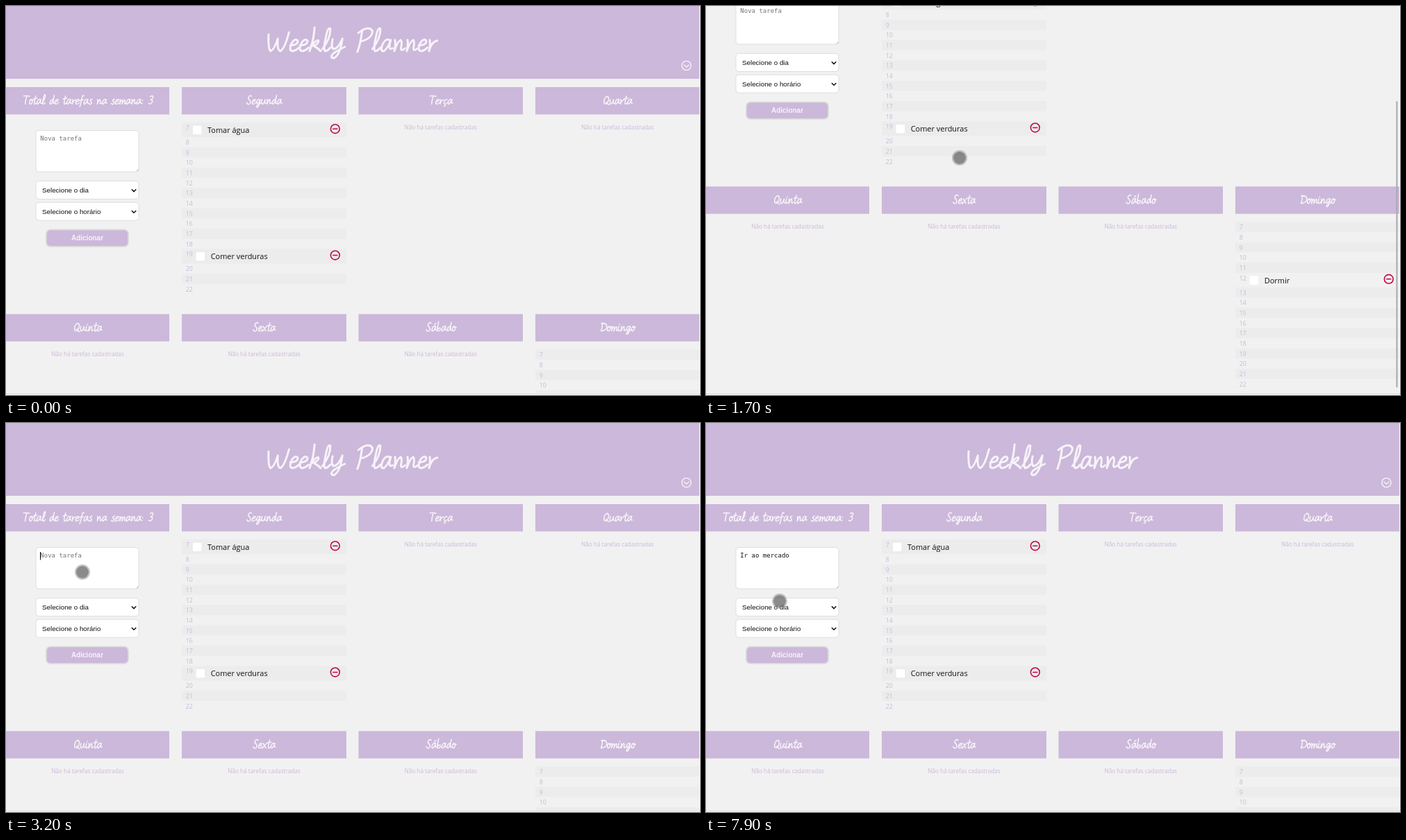
These frames come from a looping animation (999x561 px, 8000 ms). An HTML page:

```html
<!DOCTYPE html>
<html lang="pt-BR">
<head>
<meta charset="utf-8">
<title>Weekly Planner</title>
<style>
  html, body { margin: 0; width: 100%; height: 100%; overflow: hidden; background: #fff; }
  svg { display: block; width: 999px; height: 561px; }
  .lilac { fill: #ccb8da; }
  .script path { fill: none; stroke: #f6f3f8; stroke-linecap: round; stroke-linejoin: round; }
  .hour { font: 8.8px "Open Sans", "Noto Sans", sans-serif; fill: #ccb8da; }
  .empty { font: 8.23px "Open Sans", "Noto Sans", sans-serif; fill: #ccb8da; text-anchor: middle; }
  .task { font: 10.95px "Open Sans", "Noto Sans", sans-serif; fill: #111; }
  .field { fill: #fff; stroke: #dedede; }
  .option { font: 9.8px "Liberation Sans", Arial, sans-serif; fill: #111; }
  .button { font: bold 10px "Liberation Sans", Arial, sans-serif; fill: #f6f3f8; text-anchor: middle; }
  .mono { font: 9px "DejaVu Sans Mono", monospace; white-space: pre; }
  .line { fill: none; stroke-linecap: round; stroke-linejoin: round; }
</style>
</head>
<body>
<svg id="stage" viewBox="0 0 999 561" xmlns="http://www.w3.org/2000/svg">
  <defs>
    <clipPath id="view"><rect width="998" height="558"/></clipPath>
    <!-- handwriting strokes: character, advance, outline on baseline 0 -->
    <g id="glyphs">
      <path data-c="W" data-w="33" d="M1-24Q3-2 7 0Q12-2 15-18Q16-1 21 0Q27-4 30-27"/>
      <path data-c="P" data-w="23" d="M6-28Q6-10 3 1M1-26Q14-38 21-29Q22-18 6-14"/>
      <path data-c="T" data-w="22" d="M1-28Q10-30 22-27M12-28Q9-12 10 0"/>
      <path data-c="S" data-w="18" d="M15-27Q8-32 5-24Q3-18 10-14Q17-4 10 0Q4 2 1-5"/>
      <path data-c="Q" data-w="22" d="M14-27Q4-26 3-13Q3 0 10-1Q20-6 18-20Q16-28 9-25M11-7Q14 0 22 2"/>
      <path data-c="D" data-w="22" d="M5-27Q6-10 3 0Q22-2 21-15Q18-29 1-26"/>
      <path data-c="a" data-w="18" d="M13-15Q7-20 3-10Q0 1 6 0Q11-4 14-16Q11 0 18-4"/>
      <path data-c="á" data-w="18" d="M13-15Q7-20 3-10Q0 1 6 0Q11-4 14-16Q11 0 18-4M9-22L13-27"/>
      <path data-c="b" data-w="16" d="M4-32Q2-10 3-1Q13 3 13-8Q11-14 4-7"/>
      <path data-c="ç" data-w="15" d="M12-14Q8-19 4-11Q1 0 7 0Q11-1 14-5M7 0Q11 6 4 7"/>
      <path data-c="d" data-w="18" d="M12-14Q6-18 3-9Q0 0 6 0Q12-4 14-30Q11 0 17-3"/>
      <path data-c="e" data-w="14" d="M1-8Q13-9 11-15Q7-19 3-12Q-1 0 6 0Q11-1 14-5"/>
      <path data-c="f" data-w="14" d="M13-28Q8-34 7-20Q5 2 3 9M0-13L13-15"/>
      <path data-c="g" data-w="18" d="M12-15Q5-19 3-9Q2-1 7-2Q12-6 14-16Q14 5 8 11Q1 10 6 4Q11 0 19-4"/>
      <path data-c="i" data-w="10" d="M3-16Q1 0 5 0Q8-1 11-5M5-23v1"/>
      <path data-c="k" data-w="19" d="M2 0Q6-14 5-34M3-8Q14-20 13-13Q11-8 5-8Q10-7 18 0"/>
      <path data-c="l" data-w="12" d="M1-3Q11-18 9-32Q5-36 4-20Q2 0 6 0Q10-1 12-5"/>
      <path data-c="m" data-w="23" d="M2-16Q4-10 3 0Q6-15 9-15Q12-13 11 0Q14-15 18-15Q20-12 19-4Q20 1 24-4"/>
      <path data-c="n" data-w="18" d="M2-16Q4-10 3 0Q6-14 10-16Q13-14 12-4Q13 1 18-4"/>
      <path data-c="o" data-w="14" d="M9-16Q2-17 2-7Q2 0 7 0Q13-3 11-13Q10-16 7-14Q10-11 15-13"/>
      <path data-c="r" data-w="13" d="M2-16Q4-10 3 0Q5-14 13-15"/>
      <path data-c="s" data-w="13" d="M10-17Q3-16 5-11Q13-5 9-1Q5 2 1-2"/>
      <path data-c="t" data-w="12" d="M7-28Q3-4 6 0Q8 1 12-4M0-18L13-20"/>
      <path data-c="u" data-w="18" d="M2-16Q1 0 6 0Q11-2 13-16Q11 0 18-3"/>
      <path data-c="x" data-w="16" d="M2-16Q8-8 13 0M14-17Q7-7 1 1"/>
      <path data-c="y" data-w="21" d="M2-17Q1-3 6-3Q12-4 16-18Q16 4 8 10Q0 10 6 3Q12-2 21-6"/>
      <path data-c=":" data-w="10" d="M3-13v1M2-3v1"/>
      <path data-c="3" data-w="16" d="M3-26Q15-32 13-22Q11-16 6-15Q15-15 12-6Q8 3 1-3"/>
    </g>
  </defs>

  <g clip-path="url(#view)">
    <rect width="998" height="558" fill="#f1f1f1"/>
    <g id="page">
      <rect class="lilac" width="998" height="105"/>
      <g class="line" stroke="#f6f3f8" stroke-width="1.4">
        <circle cx="979.5" cy="86" r="6.6"/>
        <path d="M976 85l3.5 3 3.5-3"/>
      </g>
      <g id="days"></g>
      <rect class="field" x="43" y="179.5" width="148" height="59.5" rx="4"/>
      <path class="line" d="M188.5 238l2-2" stroke="#888" stroke-width=".7"/>
      <text id="entry" class="mono" x="49.3" y="194"></text>
      <rect id="caret" y="186" width="1" height="11.5" fill="#111"/>
      <rect class="field" x="43" y="252.5" width="148" height="26" rx="4"/>
      <text class="option" x="52" y="269">Selecione o dia</text>
      <rect class="field" x="43" y="283.2" width="148" height="26" rx="4"/>
      <text class="option" x="52" y="299.6">Selecione o horário</text>
      <path class="line" d="M181.3 264.8l2.8 2.8 2.8-2.8M181.3 295.5l2.8 2.8 2.8-2.8" stroke="#111" stroke-width="1.5"/>
      <rect class="lilac" x="58" y="322.7" width="118" height="24.2" rx="6" stroke="#dadada" stroke-width="1.8"/>
      <text class="button" x="117" y="338">Adicionar</text>
    </g>
    <rect id="bar" x="993.5" width="2" height="413" rx="1" fill="#a8a8ab"/>
  </g>
  <rect y="558" width="999" height="1" fill="#f1f1f1"/>
  <rect y="559" width="999" height="1" fill="#d6d6d8"/>
  <g id="pointer">
    <circle r="10" fill="none" stroke="#8c8c8c" stroke-opacity=".5" stroke-width="2"/>
    <circle r="9" fill="#646464" fill-opacity=".75"/>
  </g>
</svg>

<script>
const $ = id => document.getElementById(id);
const LOOP = 8000, STEP = 100;
const ROW = 14.66, TASK_ROW = 21;

function add(parent, tag, attrs, text) {
  const el = document.createElementNS("http://www.w3.org/2000/svg", tag);
  for (const key in attrs) el.setAttribute(key, attrs[key]);
  if (text !== undefined) el.textContent = text;
  return parent.appendChild(el);
}

const glyphs = {};
for (const el of $("glyphs").children) glyphs[el.dataset.c] = el;

// Centred line of handwriting
function write(parent, text, cx, y, size, weight, space) {
  const g = add(parent, "g", { class: "script", role: "img", "aria-label": text });
  let x = 0;
  for (const c of text) {
    const glyph = glyphs[c];
    if (glyph) {
      add(g, "path", {
        d: glyph.getAttribute("d"), "stroke-width": weight,
        transform: `translate(${x}) skewX(-7)`
      });
    }
    x += glyph ? +glyph.dataset.w : space;
  }
  g.setAttribute("transform", `translate(${cx - x * size / 2} ${y}) scale(${size})`);
}

function heading(text, x, y, w) {
  add($("days"), "rect", { class: "lilac", x, y, width: w, height: 39.4 });
  write($("days"), text, x + w / 2, y + 24.5, 0.42, 3.7, 14);
}

function addTask(x, y, hour, name) {
  const days = $("days"), box = x + (hour < 10 ? 16 : 20.7);
  add(days, "rect", { x: box, y: y + 4.5, width: 12.4, height: 12.4, rx: 1, fill: "#fff" });
  add(days, "text", { class: "task", x: box + 21, y: y + 15 }, name);
  const icon = add(days, "g", {
    class: "line", stroke: "#c2073f", "stroke-width": 1.6,
    transform: `translate(${x + 220.8} ${y + 9})`
  });
  add(icon, "circle", { r: 6.4 });
  add(icon, "path", { d: "M-3 0H3" });
}

function day(name, x, y, w, tasks) {
  const days = $("days");
  heading(name, x, y, w);
  if (!tasks) {
    add(days, "text", { class: "empty", x: x + w / 2, y: y + 61 }, "Não há tarefas cadastradas");
    return;
  }
  let top = y + 51.2;
  for (let hour = 7; hour <= 22; hour++) {
    const height = tasks[hour] ? TASK_ROW : ROW;
    if (hour % 2) add(days, "rect", { x, y: top, width: w, height, fill: "#ececec" });
    add(days, "text", { class: "hour", x: x + 5.7, y: top + 10.8 }, hour);
    if (tasks[hour]) addTask(x, top, hour, tasks[hour]);
    top += height;
  }
}

write($("page"), "Weekly Planner", 496.5, 65, 1, 3, 16);
heading("Total de tarefas na semana: 3", 0, 117, 235);
day("Segunda", 253, 117, 237, { 7: "Tomar água", 19: "Comer verduras" });
day("Terça", 507.5, 117, 236.5);
day("Quarta", 762, 117, 236.5);
day("Quinta", 0, 444.3, 235);
day("Sexta", 253, 444.3, 237);
day("Sábado", 507.5, 444.3, 236.5);
day("Domingo", 762, 444.3, 236.5, { 12: "Dormir" });

// Moves: first step, then one value per step; the last one holds
const scrolls = [[0, [0]], [14, [13, 86, 158, 184]], [21, [171, 115, 60, 22, 5, 0]]];
const moves = [
  [7, [[339, 190], [356, 208], [365, 219]]],
  [28, [[348, 219], [270, 218], [165, 216], [114, 215], [110, 215]]],
  [77, [[109, 222], [107, 244], [106, 257]]]
];
const phrase = "Ir ao mercado";
const keys = [40, 46, 51, 53, 55, 58, 60, 62, 64, 66, 68, 70, 71];

function valueAt(track, step) {
  const run = track.filter(([start]) => start <= step).pop();
  return run && run[1][Math.min(step - run[0], run[1].length - 1)];
}

function draw(step) {
  const scroll = valueAt(scrolls, step);
  $("page").setAttribute("transform", `translate(0 ${-scroll})`);
  $("bar").setAttribute("y", 1 + scroll * 0.74);
  $("bar").setAttribute("opacity", step < 14 || step > 31 ? 0 : step === 31 ? 0.5 : 1);

  const spot = valueAt(moves, step);
  $("pointer").setAttribute("visibility", spot ? "visible" : "hidden");
  if (spot) $("pointer").setAttribute("transform", `translate(${spot})`);

  const typed = keys.filter(k => k <= step).length;
  $("entry").textContent = typed ? phrase.slice(0, typed) : "Nova tarefa";
  $("entry").setAttribute("fill", typed ? "#111" : "#757575");
  const caretOn = (step >= 32 && step < 37) || (step >= 40 && step < 75);
  $("caret").setAttribute("visibility", caretOn ? "visible" : "hidden");
  $("caret").setAttribute("x", Math.round(49.3 + typed * 5.42));
}

const began = performance.now();
function tick() {
  draw(Math.floor((performance.now() - began) % LOOP / STEP));
  requestAnimationFrame(tick);
}
tick();
</script>
</body>
</html>
```
